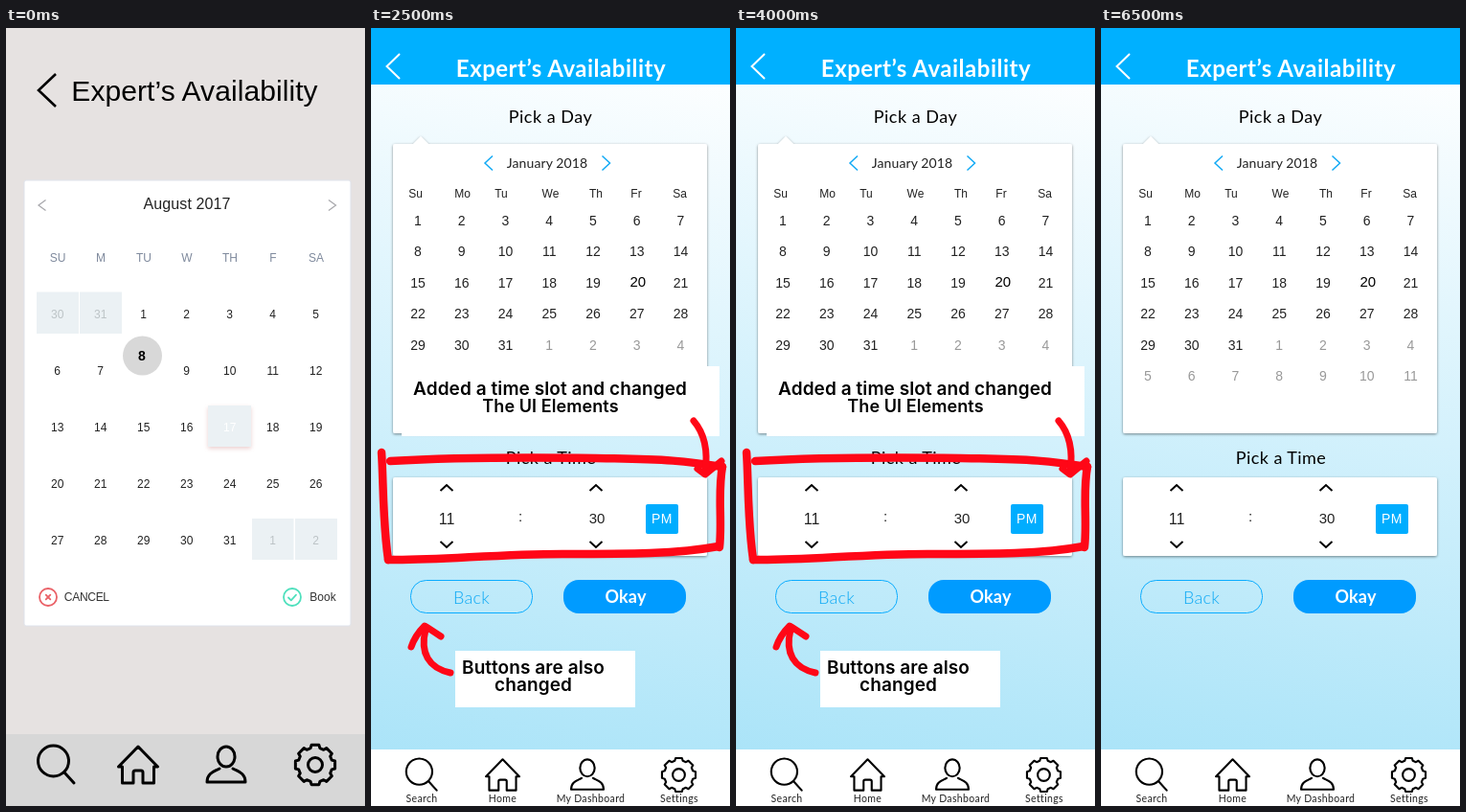
An HTML page that plays this animation: 375x812 px, repeating every 7500 ms.

```html
<!DOCTYPE html>
<html lang="en">
<head>
<meta charset="utf-8">
<title>Expert’s Availability</title>
<style>
  html, body { margin: 0; width: 100%; height: 100%; overflow: hidden; }
  svg { display: block; width: 375px; height: 812px; }
  .arial { font-family: "Liberation Sans", Arial, sans-serif; }
  .lato { font-family: Lato, sans-serif; }
  .note { font: 600 19px Inter, sans-serif; letter-spacing: .08px; }
  .line { fill: none; stroke-linecap: round; stroke-linejoin: round; }
  .flat { fill: none; }
  text { text-anchor: middle; }
</style>
</head>
<body>
<svg viewBox="0 0 375 812">
  <defs>
    <linearGradient id="sky" x1=".54" y1="0" x2=".46" y2="1">
      <stop offset="0" stop-color="#fff"/>
      <stop offset=".5" stop-color="#d3f1fc"/>
      <stop offset="1" stop-color="#a8e3f8"/>
    </linearGradient>
    <filter id="drop" x="-10%" y="-10%" width="120%" height="125%">
      <feDropShadow dx="0" dy="1" stdDeviation="1.8" flood-color="#000" flood-opacity=".46"/>
    </filter>
    <filter id="glow" x="-20%" y="-20%" width="140%" height="140%">
      <feDropShadow dx="0" dy="2" stdDeviation="2" flood-color="#d08a8a" flood-opacity=".4"/>
    </filter>
  </defs>

  <g id="before">
    <rect width="375" height="812" fill="#e6e2e1"/>
    <path class="flat" d="M52 48L34 65L52 82" stroke="#000" stroke-width="2.6"/>
    <text class="arial" x="197" y="76" font-size="30" letter-spacing=".08">Expert’s Availability</text>
    <rect x="19" y="159" width="341" height="465" rx="2" fill="#fff" stroke="#dfe3ec"/>
    <path class="flat" d="M41.500 179.500L34 185L41.500 190.500M337 179.500L344.500 185L337 190.500" stroke="#a9a9ad" stroke-width="1.3"/>
    <text class="arial" x="189" y="189" font-size="16" letter-spacing=".1" fill="#222">August 2017</text>
    <path d="M32 275.500h44v43.500h-44zM77 275.500h44v43.500h-44zM257 512h43.500v43h-43.500zM302 512h44v43h-44z" fill="#ebf1f4"/>
    <rect x="211" y="394" width="45" height="43" fill="#ebf1f4" filter="url(#glow)"/>
    <circle cx="142.500" cy="342" r="20.500" fill="#d8d8d8"/>
    <g id="august" class="arial" font-size="12"></g>
    <g class="line" stroke="#ea6268" stroke-width="1.8">
      <circle cx="44" cy="594" r="9"/>
      <path d="M41.700 591.700l4.600 4.600m0-4.600l-4.600 4.600"/>
    </g>
    <text class="arial" x="84.300" y="598" font-size="12" letter-spacing="-.3" fill="#333">CANCEL</text>
    <g class="line" stroke="#4fe0bd" stroke-width="1.8">
      <circle cx="299" cy="594" r="9"/>
      <path d="M295 594.500l2.800 2.800l5.200-5.600"/>
    </g>
    <text class="arial" x="331" y="598" font-size="12" fill="#333">Book</text>
    <rect y="737" width="375" height="75" fill="#d7d7d7"/>
    <g id="navA" class="line" stroke="#000" stroke-width="3"></g>
  </g>

  <g id="after">
    <rect width="375" height="812" fill="url(#sky)"/>
    <rect width="375" height="59" fill="#00b0ff"/>
    <path class="flat" d="M30 27L16.500 40L30 53" stroke="#fff" stroke-width="2"/>
    <g class="lato">
      <text x="198.500" y="51" font-size="24" font-weight="700" letter-spacing=".5" fill="#fff">Expert’s Availability</text>
      <text x="187.500" y="99" font-size="18" letter-spacing=".5">Pick a Day</text>
      <text x="188" y="455" font-size="18" letter-spacing=".45">Pick a Time</text>
    </g>
    <path d="M25 121H44L52 113L60 121H349q2 0 2 2V421q0 2-2 2H25q-2 0-2-2V123q0-2 2-2z" fill="#fff" filter="url(#drop)"/>
    <path class="flat" d="M127 133.500L119 141L127 148.500M241.500 133.500L249.500 141L241.500 148.500" stroke="#12aaf5" stroke-width="1.5"/>
    <text class="lato" x="184" y="146" font-size="14" letter-spacing=".1" fill="#222">January 2018</text>
    <g id="january" class="arial" font-size="14"></g>
    <rect x="23" y="469" width="328" height="82" rx="2" fill="#fff" filter="url(#drop)"/>
    <path class="flat" d="M72.500 483L79 477L85.500 483M72.500 536L79 542L85.500 536M228.500 483L235 477L241.500 483M228.500 536L235 542L241.500 536" stroke="#000" stroke-width="2"/>
    <g class="arial" font-size="15" fill="#222">
      <text x="79" y="518" font-size="16">11</text>
      <text x="156" y="515">:</text>
      <text x="236" y="517">30</text>
    </g>
    <rect x="287" y="497" width="34" height="31" rx="2" fill="#00adff"/>
    <text class="arial" x="304" y="517" font-size="14" letter-spacing=".5" fill="#fff">PM</text>
    <rect x="41.500" y="576.500" width="127" height="34" rx="16" fill="none" stroke="#0aacff"/>
    <rect x="201" y="576" width="128" height="35" rx="16" fill="#009bff"/>
    <g class="lato" font-size="18">
      <text x="105" y="601" font-weight="300" letter-spacing=".3" fill="#0aa8f5">Back</text>
      <text x="266" y="600" font-weight="700" letter-spacing=".2" fill="#fff">Okay</text>
    </g>
    <rect y="753" width="375" height="59" fill="#fff"/>
    <g id="navB" class="line" stroke="#000" stroke-width="2.500"></g>
    <g class="lato" font-size="10.500" letter-spacing=".35" fill="#222">
      <text x="53" y="808">Search</text>
      <text x="137.500" y="808">Home</text>
      <text x="229.500" y="808">My Dashboard</text>
      <text x="322" y="808">Settings</text>
    </g>
  </g>

  <g id="notes">
    <path d="M32 353H364V426H32zM88 650H276V709H88z" fill="#fff"/>
    <g class="note">
      <text x="187" y="383">Added a time slot and changed</text>
      <text x="187.500" y="401" style="font-size:18px">The UI Elements</text>
      <text x="169.500" y="674">Buttons are also</text>
      <text x="169.500" y="692">changed</text>
    </g>
    <g class="line" stroke="#ff0717" stroke-width="8.500">
      <path d="M11 443C13 470 12 515 18 555"/>
      <path d="M20 452C90 448 160 448 235 449S330 452 367 458"/>
      <path d="M367 458C362 485 367 515 364 542"/>
      <path d="M18 555C70 556 130 549 200 549S320 549 363 541"/>
      <g stroke-width="7">
        <path d="M337 410C350 425 352 443 349 464"/>
        <path d="M341 460L349 466L366 452"/>
        <path d="M83 673C60 668 51 652 57 628"/>
        <path d="M42 646C45 637 50 630 56 624C61 627 67 631 73 635"/>
      </g>
    </g>
  </g>
</svg>
<script>
const $ = id => document.getElementById(id);
const label = (x, y, s, more = "") => `<text x="${x}" y="${y}" ${more}>${s}</text>`;

function cog(teeth, out, inn) {
  const pts = [], step = 2 * Math.PI / teeth;
  for (let i = 0; i < teeth; i++) {
    for (const [part, r] of [[-.35, inn], [-.24, out], [.24, out], [.35, inn]]) {
      const a = (i + part) * step;
      pts.push((r * Math.sin(a)).toFixed(2) + " " + (-r * Math.cos(a)).toFixed(2));
    }
  }
  return `<path d="M${pts.join("L")}Z"/><circle r="7.500"/>`;
}

const icons = [
  '<circle cx="-2.500" cy="-4" r="16"/><path d="M9 8L19 19"/>',
  '<path d="M-16.500 2H-20.500L0-19L20.500 2H16.500V19H5V8Q5 6 3 6H-3Q-5 6-5 8V19H-16.500Z"/>',
  '<ellipse cy="-8.500" rx="9" ry="10.500"/><path d="M-7 4C-12 7-20 8-20 18H20C20 8 12 7 7 4"/>',
  cog(8, 21, 18)
];

function nav(id, xs, y, size) {
  $(id).innerHTML = icons.map((d, i) =>
    `<g transform="translate(${xs[i]} ${y}) scale(${size})">${d}</g>`).join("");
}

function august() {
  let s = "";
  ["SU", "M", "TU", "W", "TH", "F", "SA"].forEach((d, i) => {
    s += label(54 + i * 45, 244, d, 'fill="#7f8a9d"');
  });
  for (let i = 0; i < 35; i++) {
    const n = i - 1, x = 53.7 + i % 7 * 45, y = 303 + Math.floor(i / 7) * 59;
    if (n === 8) s += label(142, 347, 8, 'font-size="14" font-weight="700"');
    else if (n < 1) s += label(x, y, n + 31, 'fill="#bcc3c6"');
    else if (n > 31) s += label(x, y, n - 31, 'fill="#bcc3c6"');
    else s += label(x, y, n, n === 17 ? 'fill="#fff"' : 'fill="#222"');
  }
  $("august").innerHTML = s;
}

function january() {
  const heads = { Su: 46.5, Mo: 95.5, Tu: 136, We: 187.5, Th: 235, Fr: 277, Sa: 322.5 };
  let s = "";
  for (const d in heads) s += label(heads[d], 177, d, 'font-size="12" fill="#222"');
  for (let i = 0; i < 42; i++) {
    const x = 49 + i % 7 * 45.75, y = 206 + Math.floor(i / 7) * 32.4;
    if (i === 19) s += label(x + 1, y - 1, 20, 'fill="#000" font-size="15"');
    else s += label(x, y.toFixed(1), i % 31 + 1, `fill="${i < 31 ? "#222" : "#999"}"`);
  }
  $("january").innerHTML = s;
}

august();
january();
nav("navA", [52, 138, 230, 323], 769, 1);
nav("navB", [52.5, 137.5, 226, 321.5], 779.5, .85);

const show = (id, on) => $(id).setAttribute("visibility", on ? "visible" : "hidden");

function draw(ms) {
  const scene = Math.floor(ms % 7500 / 2500);
  show("before", scene === 0);
  show("after", scene > 0);
  show("notes", scene === 1);
}

const start = performance.now();
function tick() {
  draw(performance.now() - start);
  requestAnimationFrame(tick);
}
tick();
</script>
</body>
</html>
```
